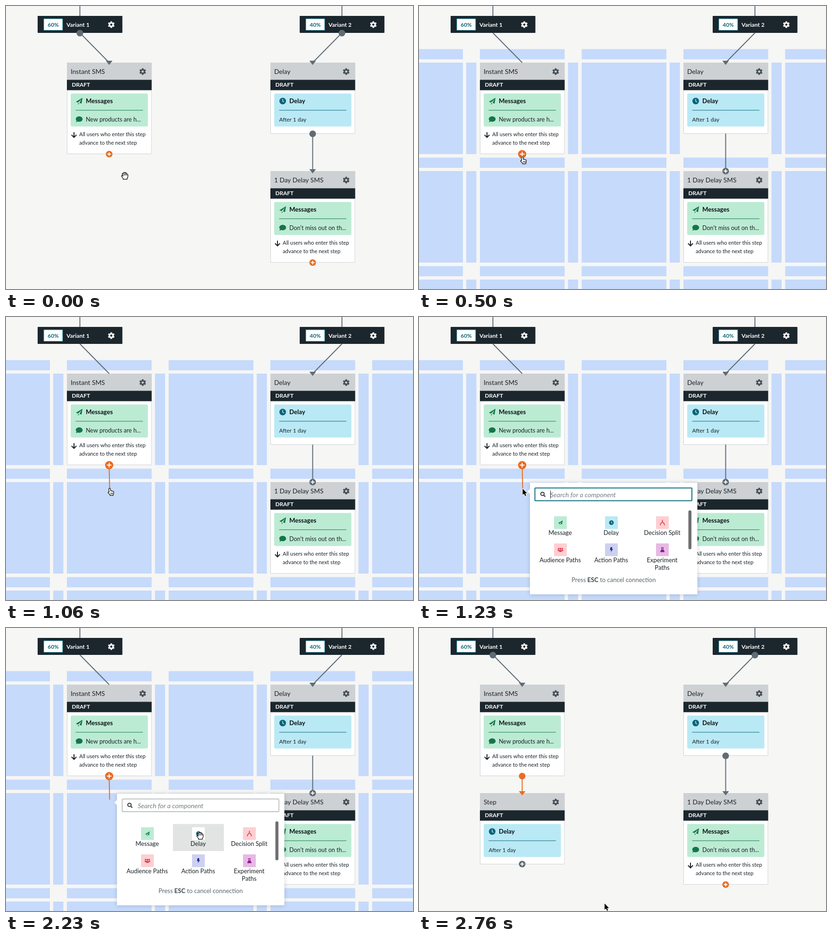
Animation, 862 px wide and 600 px high, one loop 2.8 s. Source, as an HTML page with a canvas:

```html
<!DOCTYPE html>
<html lang="en">
<head>
<meta charset="utf-8">
<title>Flow builder</title>
<style>
html, body { margin: 0; width: 100%; height: 100%; overflow: hidden; background: #f6f6f5; }
canvas { display: block; width: 862px; height: 600px; }
</style>
</head>
<body>
<canvas id="stage" width="862" height="600"></canvas>
<script>
const ctx = document.getElementById('stage').getContext('2d');
const LOOP = 2800;
const C = {
  page: '#f6f6f5', grid: '#c6dafb', dark: '#1b262d', head: '#ced1d4', ink: '#1b2227',
  gear: '#465058', wire: '#5f6c75', orange: '#e86d24', green: '#bcebd4', leaf: '#13764a',
  sky: '#b9e9f5', teal: '#0d6478', focus: '#0f7080', white: '#fff'
};

function rect(x, y, w, h, fill, radius = 0) {
  ctx.fillStyle = fill;
  ctx.beginPath();
  ctx.roundRect(x, y, w, h, radius);
  ctx.fill();
}

function outline(x, y, w, h, color, width = 1, radius = 0) {
  ctx.strokeStyle = color;
  ctx.lineWidth = width;
  ctx.beginPath();
  ctx.roundRect(x, y, w, h, radius);
  ctx.stroke();
}

function disc(x, y, r, fill) {
  ctx.fillStyle = fill;
  ctx.beginPath();
  ctx.arc(x, y, r, 0, Math.PI * 2);
  ctx.fill();
}

function line(points, color, width = 2) {
  ctx.strokeStyle = color;
  ctx.lineWidth = width;
  ctx.beginPath();
  points.forEach(([x, y]) => ctx.lineTo(x, y));
  ctx.stroke();
}

function text(str, x, y, size, color = C.ink, style = '', align = 'left') {
  ctx.font = `${style} ${size}px Lato, sans-serif`;
  ctx.fillStyle = color;
  ctx.textAlign = align;
  ctx.fillText(str, x, y);
}

function at(x, y, scale, draw) {
  ctx.save();
  ctx.translate(x, y);
  ctx.scale(scale, scale);
  draw();
  ctx.restore();
}

function fillPath(path, color) {
  ctx.fillStyle = color;
  ctx.fill(path);
}

// Icons, each centred on its own origin
const PLANE = new Path2D('M-7 1.6L7-7L5 5.6L.8 3.8L4.6-3.6L-2.6 3.2ZM-2.2 4.2L.4 5.2L-2.2 7.6Z');
const BUBBLE = new Path2D('M0-6C4.2-6 7.2-3.5 7.2-.3S4.2 5.4 0 5.4Q-2 5.4-3.4 4.8Q-5 6.3-7.2 6.2Q-5.9 4.8-5.6 3.2Q-7.2 1.6-7.2-.3C-7.2-3.5-4.2-6 0-6Z');
const BOLT = new Path2D('M-1.8-5.5H2L.9-1.7H3.4L-1.3 5.5L-.3.7H-3Z');
const FLASK = new Path2D('M-3-5.5H3V-4H2.2V-.8L5 4Q5.4 5.5 4 5.5H-4Q-5.4 5.5-5 4L-2.2-.8V-4H-3Z');

const plane = color => fillPath(PLANE, color);
const bubble = color => fillPath(BUBBLE, color);
const bolt = color => fillPath(BOLT, color);

function clock(color, hands) {
  disc(0, 0, 7, color);
  line([[0, -4.3], [0, .3], [2.8, 2.2]], hands, 1.5);
}

function split(color) {
  line([[0, -6], [0, -1.5]], color, 1.7);
  line([[-4.5, 5.5], [-3.7, 2.2], [0, -1.5], [3.7, 2.2], [4.5, 5.5]], color, 1.7);
}

function people(color) {
  for (const side of [-1, 1]) {
    disc(side * 4.2, -2.6, 1.7, color);
    rect(side * 4.4 - 1.8, -.2, 3.6, 3, color, 1.2);
  }
  disc(0, -2, 2.1, color);
  rect(-3.2, .8, 6.4, 4, color, 1.6);
}

function flask(color, gap) {
  fillPath(FLASK, color);
  rect(-1, -4, 2, 3.5, gap);
}

function gear(x, y, color, hole) {
  at(x, y, 1, () => {
    disc(0, 0, 5.3, color);
    for (let i = 0; i < 6; i++) {
      rect(-1.9, -7.1, 3.8, 4, color, .8);
      ctx.rotate(Math.PI / 3);
    }
    disc(0, 0, 2.3, hole);
  });
}

function plus(x, y, color, r = 7) {
  disc(x, y, r, color);
  const arm = r * .56;
  line([[x - arm, y], [x + arm, y]], C.white);
  line([[x, y - arm], [x, y + arm]], C.white);
}

function arrowHead(x, y, color) {
  ctx.fillStyle = color;
  ctx.beginPath();
  ctx.moveTo(x - 7, y - 4);
  ctx.lineTo(x + 7, y - 4);
  ctx.lineTo(x, y + 5);
  ctx.fill();
}

function variant(x, share, label) {
  line([[x + 89.5, 0], [x + 89.5, 22]], C.wire);
  rect(x, 21, 179.5, 36, C.dark, 1);
  rect(x + 13, 27, 40, 24.5, C.white, 1);
  outline(x + 13, 27, 40, 24.5, '#1d8da3');
  text(share, x + 33, 43.5, 11.8, C.teal, 'bold', 'center');
  text(label, x + 61, 44, 12.2, C.white, 'bold');
  gear(x + 156, 39.5, C.white, C.dark);
}

function card(x, y, title, message) {
  const height = message ? 194 : 151;
  rect(x, y, 179.5, height, C.white);
  outline(x + .5, y + .5, 178.5, height - 1, '#cfd2d4');
  rect(x, y, 179.5, 37, C.head);
  text(title, x + 8, y + 23.8, 13.7);
  gear(x + 160.5, y + 19, C.gear, C.head);
  rect(x, y + 36.5, 179.5, 22, C.dark);
  text('DRAFT', x + 10.5, y + 51.3, 11.8, C.white, 'bold');

  const accent = message ? C.leaf : C.teal;
  rect(x + 8, y + 65.5, 163.5, 70, message ? C.green : C.sky, 3);
  at(x + 26, y + 81.5, 1, () => message ? plane(accent) : clock(accent, C.sky));
  text(message ? 'Messages' : 'Delay', x + 40, y + 86, 13.2, '#0c1216', 'bold');
  line([[x + 18.5, y + 101], [x + 161, y + 101]], accent, 1);
  if (!message) {
    text('After 1 day', x + 18.5, y + 125, 11.8);
    return;
  }
  at(x + 26, y + 120, 1, () => bubble(accent));
  text(message, x + 40, y + 125, 12.5);
  line([[x + 15, y + 147.5], [x + 15, y + 158]], C.ink);
  line([[x + 9.8, y + 153.3], [x + 15, y + 158.5], [x + 20.2, y + 153.3]], C.ink);
  text('All users who enter this step', x + 26, y + 156, 11.3);
  text('advance to the next step', x + 26, y + 174, 11.3);
}

// Cells that hold a card are left out as drop targets
const TAKEN = ['0,0', '2,0', '2,1'];

function grid() {
  for (let row = 0; row < 3; row++) {
    const y = 120 + row * 230;
    for (let col = -1; col < 5; col++) {
      const x = 129 + col * 215.5;
      rect(x, y - 28.5, 179.5, 21.5, C.grid);
      rect(x - 29, y, 21.5, 194, C.grid);
      if (!TAKEN.includes(`${col},${row}`)) rect(x, y, 179.5, 194, C.grid);
    }
  }
}

const ITEMS = [
  [['Message'], C.green, () => plane(C.leaf), .68],
  [['Delay'], C.sky, bg => clock(C.teal, bg), .7],
  [['Decision Split'], '#fdcfd2', () => split('#e23c47'), 1],
  [['Audience Paths'], '#fdcfd2', () => people('#dc3d48'), .95],
  [['Action Paths'], '#cdd1ef', () => bolt('#1d2a97'), 1],
  [['Experiment', 'Paths'], '#e6b9e5', bg => flask('#92168f', bg), .9]
];

function popup(hovered, focused, caret) {
  ctx.save();
  ctx.shadowColor = 'rgba(40,50,70,.22)';
  ctx.shadowBlur = 9;
  ctx.shadowOffsetY = 1;
  rect(235, 351, 354.5, 237, C.white, 1);
  ctx.restore();
  ctx.fillStyle = C.white;
  ctx.beginPath();
  ctx.moveTo(235.5, 364);
  ctx.lineTo(229.5, 370);
  ctx.lineTo(235.5, 376);
  ctx.fill();

  if (focused) outline(245.5, 362.5, 332.5, 27, C.focus, 2, 1);
  else outline(246, 362.5, 332, 27, '#858b8f', 1, 1);
  ctx.strokeStyle = '#333d44';
  ctx.lineWidth = 2;
  ctx.beginPath();
  ctx.arc(261.5, 375, 3.6, 0, Math.PI * 2);
  ctx.stroke();
  line([[264, 377.5], [267.5, 381]], '#333d44', 2.2);
  text('Search for a component', focused ? 278 : 279, 381.5, 14.1, '#777d81', 'italic');
  if (caret) rect(278, 368, 1, 17, C.ink);

  ITEMS.forEach(([labels, tint, icon, scale], i) => {
    const x = 299 + (i % 3) * 108, y = 436 + Math.floor(i / 3) * 57.5;
    const active = i === hovered;
    if (active) rect(x - 53.5, y - 20.5, 108, 57.5, '#e1e4e3');
    const bg = active ? C.white : tint;
    rect(x - 13, y - 13.5, 27, 27, bg, 1);
    at(x + .5, y, scale, () => icon(bg));
    labels.forEach((label, n) => text(label, x, y + 26 + n * 16, 12.9, C.ink, '', 'center'));
  });
  rect(570.5, 410, 6.5, 82.5, '#707070', 3);

  const hint = [['Press ', ''], ['ESC', 'bold'], [' to cancel connection', '']];
  let x = 323;
  for (const [part, style] of hint) {
    text(part, x, 562, 13, style ? '#3b454c' : '#59646b', style);
    x += ctx.measureText(part).width;
  }
}

// Cursors are drawn around their hot spot
const CURSORS = {
  arrow: [new Path2D('M0 0V13.2L3 10.6L5.2 15.4L7.4 14.4L5.3 9.8H9.4Z'), null],
  point: [
    new Path2D('M-1 7.6L-1.8 1.4Q-1.6-.6 0-.5Q1.3-.4 1.6 1L2.3 5Q3.5 4.2 4.4 5.5Q5.8 4.7 6.6 6.1Q8.6 5.9 8.7 7.8Q9 11 7.6 13V14.6H.8V13.3L-3.2 9Q-3.4 6.7-1 7.6Z'),
    new Path2D('M2.4 9V12M4.4 9V12M6.3 9V12')
  ],
  open: [
    new Path2D('M-3.4 7.4V5.6L-7 1Q-7-1.2-5-.4L-3.8.8L-5.4-4Q-4.8-6-3-4.5L-2.6-6.5Q-1.2-8-.2-6.6Q1.5-8 2.4-5.8Q4.3-6.4 4.8-4.2V-3Q6.8-3.2 7-1.2Q7 3 5 5.6V7.4Z'),
    new Path2D('M-3-4.5L-1.9-.6M-.2-6.6L.2-.8M2.4-5.8L2.3-.8M4.8-3L4.5-.5')
  ]
};

function cursor(kind, x, y) {
  const [shape, detail] = CURSORS[kind];
  const arrow = kind === 'arrow';
  at(x, y, 1, () => {
    ctx.lineJoin = 'round';
    ctx.strokeStyle = arrow ? C.white : '#000';
    ctx.lineWidth = arrow ? 2 : 1.2;
    ctx.fillStyle = arrow ? '#000' : C.white;
    if (arrow) ctx.stroke(shape);
    ctx.fill(shape);
    if (!arrow) ctx.stroke(shape);
    if (detail) {
      ctx.lineWidth = 1;
      ctx.stroke(detail);
    }
  });
}

const easeOut = p => 1 - (1 - p) ** 3;
const easeBoth = p => p * p * (3 - 2 * p);
const MOVES = [
  [30, 330, 218.5, 320, easeBoth],
  [700, 1160, 219.5, 364, easeOut],
  [1230, 1700, 275.5, 430, easeBoth],
  [1760, 1960, 411, 440.5, easeBoth],
  [2630, 2760, 393, 584, easeBoth]
];

function pointer(t) {
  let x = 251.5, y = 360;
  for (const [start, end, toX, toY, ease] of MOVES) {
    const p = ease(Math.min(1, Math.max(0, (t - start) / (end - start))));
    x += (toX - x) * p;
    y += (toY - y) * p;
  }
  return [x, y];
}

function cursorKind(t, onPlus, hovered) {
  if (t >= 2750) return 'arrow';
  if (t >= 2225) return 'open';
  if (t >= 1225) return hovered < 0 ? 'arrow' : 'point';
  if (t >= 1160) return 'arrow';
  return onPlus ? 'point' : 'open';
}

function draw(t) {
  const [x, y] = pointer(t);
  const linking = t >= 495 && t < 2255;
  const menu = t >= 1225 && t < 2255;
  const added = t >= 2255;
  const onPlus = t < 2255 && (t > 400 || Math.hypot(x - 218.5, y - 314) < 9);
  const hovered = menu && y > 415.5 ? (x < 353 ? 0 : 1) : -1;

  rect(0, 0, 862, 600, C.page);
  if (linking) grid();
  variant(67, '60%', 'Variant 1');
  variant(622, '40%', 'Variant 2');
  card(129, 120, 'Instant SMS', 'New products are h...');
  card(560, 120, 'Delay');
  card(560, 350, '1 Day Delay SMS', 'Don\u2019t miss out on th...');
  if (added) card(129, 350, 'Step');

  line([[156.5, 57], [218.5, 120]], C.wire);
  line([[711.5, 57], [649.5, 120]], C.wire);
  line([[649.5, 270.5], [649.5, 350]], C.wire);
  arrowHead(649.5, 120, C.wire);
  if (linking) {
    plus(649.5, 350, C.wire);
  } else {
    arrowHead(218.5, 120, C.wire);
    arrowHead(649.5, 350, C.wire);
    disc(156.5, 57.5, 7, C.wire);
    disc(711.5, 57.5, 7, C.wire);
    disc(649.5, 271, 7, C.wire);
    plus(649.5, 544, C.orange);
  }

  if (added) {
    line([[218.5, 314], [218.5, 350]], C.orange);
    arrowHead(218.5, 350, C.orange);
    disc(218.5, 314, 7, C.orange);
    plus(218.5, 500.5, C.wire);
  } else {
    if (linking && t >= 700) {
      const end = pointer(Math.min(t, 1160));
      line([[218.5, 314], end], C.orange);
    }
    plus(218.5, 314, C.orange, onPlus ? 8.7 : 7);
  }

  if (menu) {
    const focused = t < 2125;
    popup(hovered, focused, focused && (t < 1460 || t >= 1955));
  }
  cursor(cursorKind(t, onPlus, hovered), x, y);
}

const start = performance.now();
function tick() {
  draw((performance.now() - start) % LOOP);
  requestAnimationFrame(tick);
}
tick();
</script>
</body>
</html>
```
